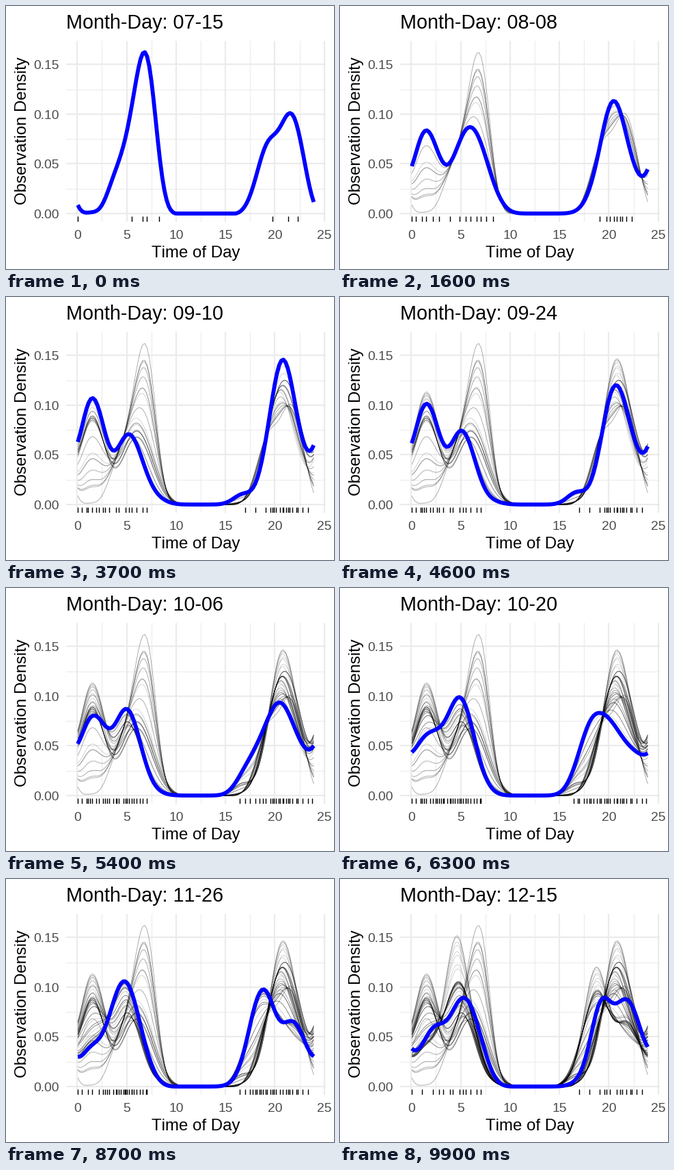
Recreate the animation shown at these times as a matplotlib script. Size 480 by 384 pixels, loop 10 s.

```python
import matplotlib.pyplot as plt
import numpy as np
from matplotlib.animation import FuncAnimation
from matplotlib.collections import LineCollection

W, H, DPI = 480, 384, 72
FRAMES, DAYS = 100, 153
LEFT, RIGHT, TOP, BOTTOM = 88.4, 468, 51, 315
X0, Y0, PX_HOUR, PX_DENSITY = 104.2, 303, 14.46, 1451
BLUE_WIDTH, BELL_WIDTH = 5.8, .95

plt.rcParams.update({"font.family": "Liberation Sans",
                     "text.kerning_factor": 6})
rng = np.random.default_rng(4)

# Density in thousandths every 1.2 hours through the night, 16:48 to 08:24.
NODES = 1.2 * np.arange(-6, 8)
KEYS = {
    0: [5, 34, 71, 85, 101, 63, 10, 1, 7, 36, 73, 136, 153, 52],
    16: [4, 24, 73, 113, 86, 44, 46, 81, 70, 49, 70, 87, 67, 30],
    28: [4, 22, 72, 118, 118, 73, 54, 86, 72, 38, 50, 68, 51, 20],
    46: [13, 20, 66, 117, 103, 60, 60, 98, 86, 58, 73, 59, 22, 5],
    63: [38, 73, 83, 73, 56, 44, 43, 58, 66, 79, 99, 74, 28, 5],
    87: [33, 82, 95, 68, 66, 51, 30, 39, 51, 83, 106, 78, 32, 6],
    99: [9, 43, 87, 84, 88, 70, 39, 44, 61, 67, 86, 82, 45, 11],
}
# Short-lived swells: frame, hour, height in thousandths.
SWELLS = [(36, 20.9, 26), (40, 1.5, 13), (92, 4.5, 48), (92, 18.6, 24)]
SWELL_SPAN = 5


def bells(x, centres):
    """Bell curves on the 24 hour clock, one column per centre."""
    d = (np.subtract.outer(x, centres) + 12) % 24 - 12
    return np.exp(-.5 * (d / BELL_WIDTH) ** 2)


xs = np.linspace(.06, 23.94, 110)
basis = bells(xs, NODES) @ np.linalg.inv(bells(NODES, NODES))
key_frames = list(KEYS)
key_rows = np.array(list(KEYS.values()))

# Uneven progress: the curve mostly rests and sometimes jumps.
progress = np.cumsum(rng.random(FRAMES) ** 5)


def density(i):
    row = [np.interp(progress[i], progress[key_frames], col)
           for col in key_rows.T]
    y = basis @ row
    for mid, hour, height in SWELLS:
        fade = max(0, 1 - ((i - mid) / SWELL_SPAN) ** 2)
        y += fade * height * bells(xs, hour)
    return np.maximum(y, 0) / 1000


# Each candidate mark shows while the density there exceeds its own level.
MARKS = 300
mark_hours = np.linspace(.1, 23.95, MARKS) + rng.normal(0, .05, MARKS)
mark_levels = np.arange(MARKS) * .618 % 1


def rug_marks(i):
    count = np.interp(i, [0, 16, 46, 60, 90, 99], [8, 24, 35, 58, 55, 28])
    here = np.interp(mark_hours, *curves[i].T)
    return mark_hours[here * count * 24 / MARKS > mark_levels]


curves = [np.column_stack([xs, density(i)]) for i in range(FRAMES)]
start_day = np.datetime64("2021-07-15")

fig = plt.figure(figsize=(W / DPI, H / DPI), dpi=DPI, facecolor="white")
ax = fig.add_axes([LEFT / W, 1 - BOTTOM / H,
                   (RIGHT - LEFT) / W, (BOTTOM - TOP) / H])
ax.set_xlim((LEFT - X0) / PX_HOUR, (RIGHT - X0) / PX_HOUR)
ax.set_ylim((Y0 - BOTTOM) / PX_DENSITY, (Y0 - TOP) / PX_DENSITY)
ax.axis("off")


def label(x, y, s, size, **kw):
    return fig.text(x / W, 1 - y / H, s, fontsize=size, **kw)


def tick(x, y, s, ha):
    label(x, y, s, 19.2, color="#4D4D4D", ha=ha)


for k in range(11):
    hour, level, major = 2.5 * k, .025 * k, k % 2 == 0
    style = dict(color="#EBEBEB", lw=2.13 if major else 1.07, zorder=major)
    ax.axvline(hour, **style)
    if major:
        tick(X0 + hour * PX_HOUR, 340, f"{hour:.0f}", "center")
    if k < 7:
        ax.axhline(level, **style)
        if major:
            tick(77.3, Y0 - level * PX_DENSITY + 6.8, f"{level:.2f}", "right")

label(277.6, 367, "Time of Day", 24, ha="center")
label(29.7, 182.2, "Observation Density", 24, rotation=90, ha="center",
      va="baseline", rotation_mode="anchor")
title = label(LEFT, 33, "", 28.8)

shadows = LineCollection([], colors=[(0, 0, 0, .22)], linewidths=.75, zorder=2)
rug = LineCollection([], colors="black", linewidths=1.4, zorder=3,
                     transform=ax.get_xaxis_transform())
ax.add_collection(shadows, autolim=False)
ax.add_collection(rug, autolim=False)
line, = ax.plot([], [], color="blue", lw=BLUE_WIDTH, zorder=4,
                solid_capstyle="butt", solid_joinstyle="round")


def update(i):
    title.set_text(f"Month-Day: {str(start_day + i * DAYS // 99)[5:]}")
    shadows.set_segments(curves[:i])
    rug.set_segments([[(x, 0), (x, .03)] for x in rug_marks(i)])
    line.set_data(*curves[i].T)
    return title, shadows, rug, line


anim = FuncAnimation(fig, update, frames=FRAMES, interval=100, repeat=True,
                     repeat_delay=0, blit=False)
plt.show()
```
